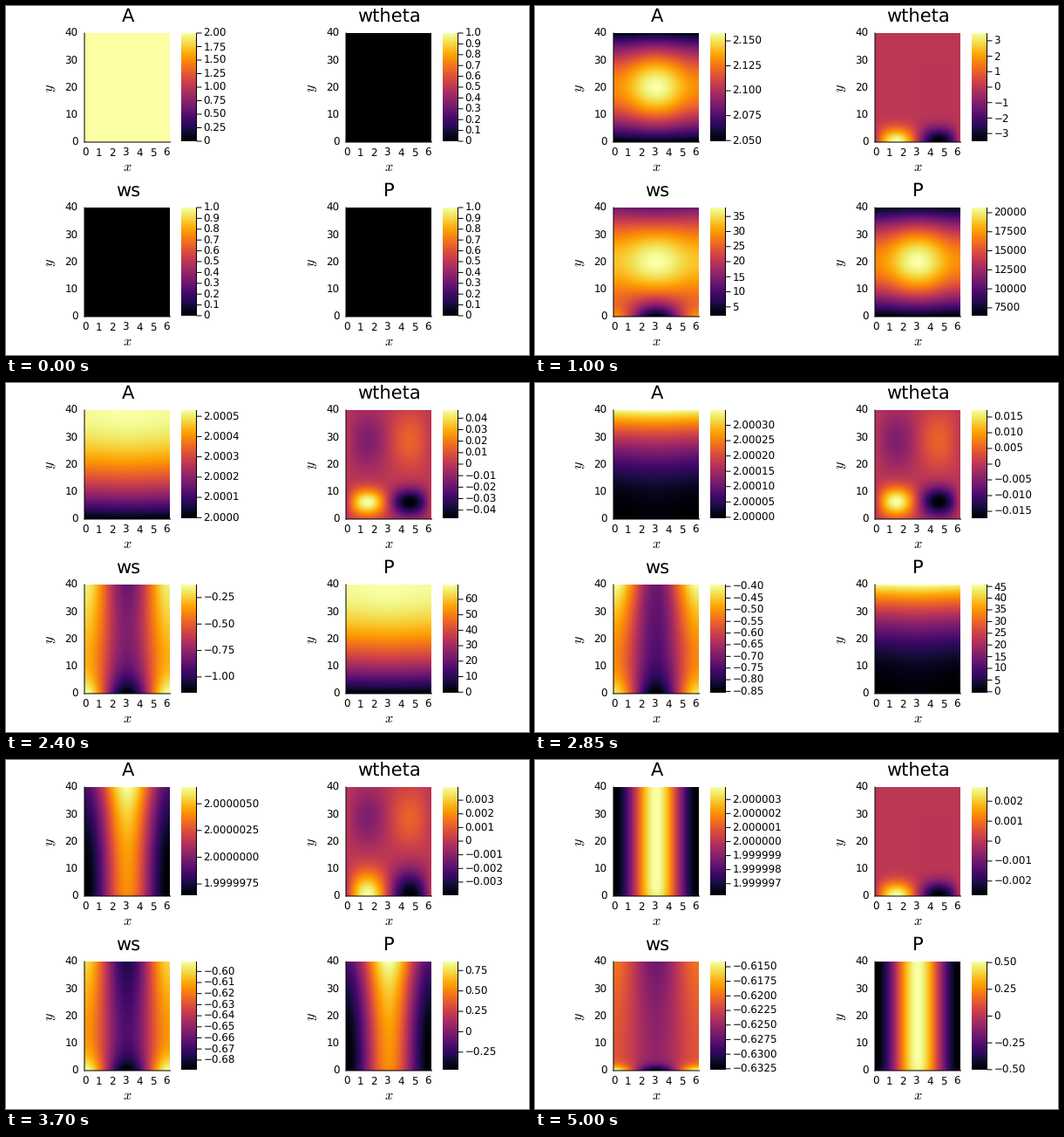
Animation, 600 px wide and 400 px high, one loop 5.05 s. Source, as a matplotlib script:

```python
import math

import numpy as np
import matplotlib.pyplot as plt
from matplotlib.animation import FuncAnimation

FRAMES, INTERVAL = 101, 50
W, H = 600, 400
PX = 0.72  # points per pixel at 100 dpi
STIFF = 131000  # pressure per unit of excess area

plt.rcParams["font.family"] = "DejaVu Sans"
plt.rcParams["mathtext.fontset"] = "cm"
plt.rcParams["text.hinting"] = "none"

x = np.linspace(0, 2 * np.pi, 129)[None, :]
y = np.linspace(0, 40, 126)[:, None]
cosx, sinx = np.cos(x), np.sin(x)


def ramp(f, start, end):
    return min(1.0, max(0.0, (f - start) / (end - start)))


def decay(f, start, tau, power=1.0):
    return math.exp(-((max(f - start, 0) / tau) ** power))


def excess_area(f):
    """Travelling pulse, a slow residual wave and the final cosine state."""
    d = y - (20.3 + 2.71 * (f - 20))
    g = np.where(abs(d) < 33.3, np.cos(np.pi / 2 * d / 33.3) ** 2, 0)
    pulse = 0.1578 * (g - 0.17 * g**2 * (1 + cosx) / 2)

    start = ramp(f, 0, 33) ** 3
    amp = 69 * start * decay(f, 48, 12.9, 2.4)
    q, mix = y / 40, ramp(f, 48, 57)
    wave = amp * ((1 - mix) * q * (2 - q) + mix * q**2.3)
    swing = 0.505 * start * cosx * (1 - 0.1 * np.exp(-y / 1.2))
    return pulse + (wave + 0.004 + min(0.04, 0.1 * amp) - swing) / STIFF


def axial(f, area):
    """Flow follows the area, plus a cosine that is strongest at the inlet."""
    start = ramp(f, 0, 12)
    base = -0.64 + 0.0166 * ramp(f, 74, 100)
    mid = 0.75 * decay(f, 33, 12)
    inlet = 13 * decay(f, 20, 5.5, 0.82) + 0.0057
    reach = 1.8 + 5 * math.sin(math.pi * f / 100)
    fade = np.exp(-((y / reach) ** 1.3))
    wave = cosx * (mid * (1 + 0.6 * (y / 40) ** 2) + inlet * fade)
    return 250 * area + start * (base + wave + inlet**2 / 50 * fade)


def swirl(f):
    """A vortex pair leaves the inlet, with a weak counter pair above it."""
    amp = math.hypot(3.5 * ramp(f, 0, 12) * decay(f, 20, 4.1, 0.76), 0.0027)
    centre = 6.4 * (1 - decay(f, 20, 10)) * (1 - ramp(f, 57, 74))
    size = 5 + 4 * math.exp(-(((f - 74) / 12) ** 2))
    upper = 0.3 * ramp(f, 20, 40) * (1 - ramp(f, 76, 100))
    low = np.exp(-(((y - centre) / size) ** 2))
    high = np.exp(-(((y - 29) / 11) ** 2))
    return amp * sinx * (low - upper * high)


def fields(f):
    if f == 0:
        flat = np.zeros((y.size, x.size))
        return flat + 2, flat, flat, flat
    area = excess_area(f)
    return 2 + area, swirl(f), axial(f, area), STIFF * area


def limits(v):
    lo, hi = float(v.min()), float(v.max())
    if lo == hi:
        return 0.0, hi or 1.0
    return lo, hi


def label(v, step, digits):
    if abs(v) < step * 1e-3:
        return "0"
    return f"{v:.{digits}f}".replace("-", "\u2212")


def ticks(lo, hi):
    """Finest 1, 2.5 or 5 step with at most ten intervals."""
    span = hi - lo
    e = math.floor(math.log10(span)) - 2
    while True:
        for m in (1, 2.5, 5):
            step = m * 10.0**e
            if span / step <= 10 + 1e-9:
                digits = max(0, -e + (m == 2.5))
                first = math.ceil(lo / step - 1e-6)
                last = math.floor(hi / step + 1e-6)
                vals = [i * step for i in range(first, last + 1)]
                return [(v, label(v, step, digits)) for v in vals]
        e += 1


fig = plt.figure(figsize=(W / 100, H / 100), dpi=100, facecolor="white")
ax = fig.add_axes([0, 0, 1, 1])
ax.axis("off")


def write(px, py, s, size=11.9, **kw):
    return ax.text(px, py, s, fontsize=size * PX, color="black", **kw)


def stroke(xs, ys):
    return ax.plot(xs, ys, color="black", lw=PX, solid_capstyle="butt",
                   snap=False, zorder=3)[0]


def image(data, left, right, bottom, top):
    return ax.imshow(data, cmap="inferno", vmin=0, vmax=1, origin="lower",
                     extent=(left, right, bottom, top), aspect="auto",
                     interpolation="nearest", zorder=1)


class Panel:
    def __init__(self, ox, oy, title):
        self.ox, self.oy = ox, oy
        self.map = image(np.zeros((y.size, x.size)),
                         ox + 90, ox + 188, oy + 156, oy + 31)
        image(np.linspace(0, 1, 256)[:, None],
              ox + 201, ox + 219, oy + 155, oy + 31)
        stroke([ox + 90] * 2, [oy + 30.5, oy + 156.5])
        stroke([ox + 89.5, ox + 189], [oy + 156] * 2)
        stroke([ox + 218.5] * 2, [oy + 31, oy + 155])
        write(ox + 139.7, oy + 18.4, title, 21, ha="center", va="baseline")
        for i in range(7):
            write(ox + 90.5 + 15.6 * i, oy + 172, str(i),
                  ha="center", va="baseline")
        for v in range(0, 41, 10):
            write(ox + 82.5, oy + 160.2 - 3.125 * v, str(v),
                  ha="right", va="baseline")
        write(ox + 139, oy + 188.5, "$x$", 16.3, ha="center", va="baseline")
        write(ox + 51, oy + 94, "$y$", 16.3, ha="center", va="center",
              rotation=90)
        self.marks = stroke([], [])
        self.labels = [write(ox + 226.5, oy, "", va="baseline")
                       for _ in range(12)]

    def show(self, v):
        lo, hi = limits(v)
        self.map.set_data((v - lo) / (hi - lo))
        for t in self.labels:
            t.set_text("")
        xs, ys = [], []
        for t, (val, s) in zip(self.labels, ticks(lo, hi)):
            py = self.oy + 155 - 124 * (val - lo) / (hi - lo)
            t.set_text(s)
            t.set_y(py + 4.2)
            xs += [self.ox + 218.5, self.ox + 224.5, np.nan]
            ys += [py, py, np.nan]
        self.marks.set_data(xs, ys)


panels = [Panel(0, 0, "A"), Panel(300, 0, "wtheta"),
          Panel(0, 200, "ws"), Panel(300, 200, "P")]
ax.set_xlim(0, W)
ax.set_ylim(H, 0)


def draw(f):
    for panel, v in zip(panels, fields(f)):
        panel.show(v)
    return []


anim = FuncAnimation(fig, draw, frames=FRAMES, init_func=lambda: draw(0),
                     interval=INTERVAL, repeat=True, repeat_delay=0)
plt.show()
```
